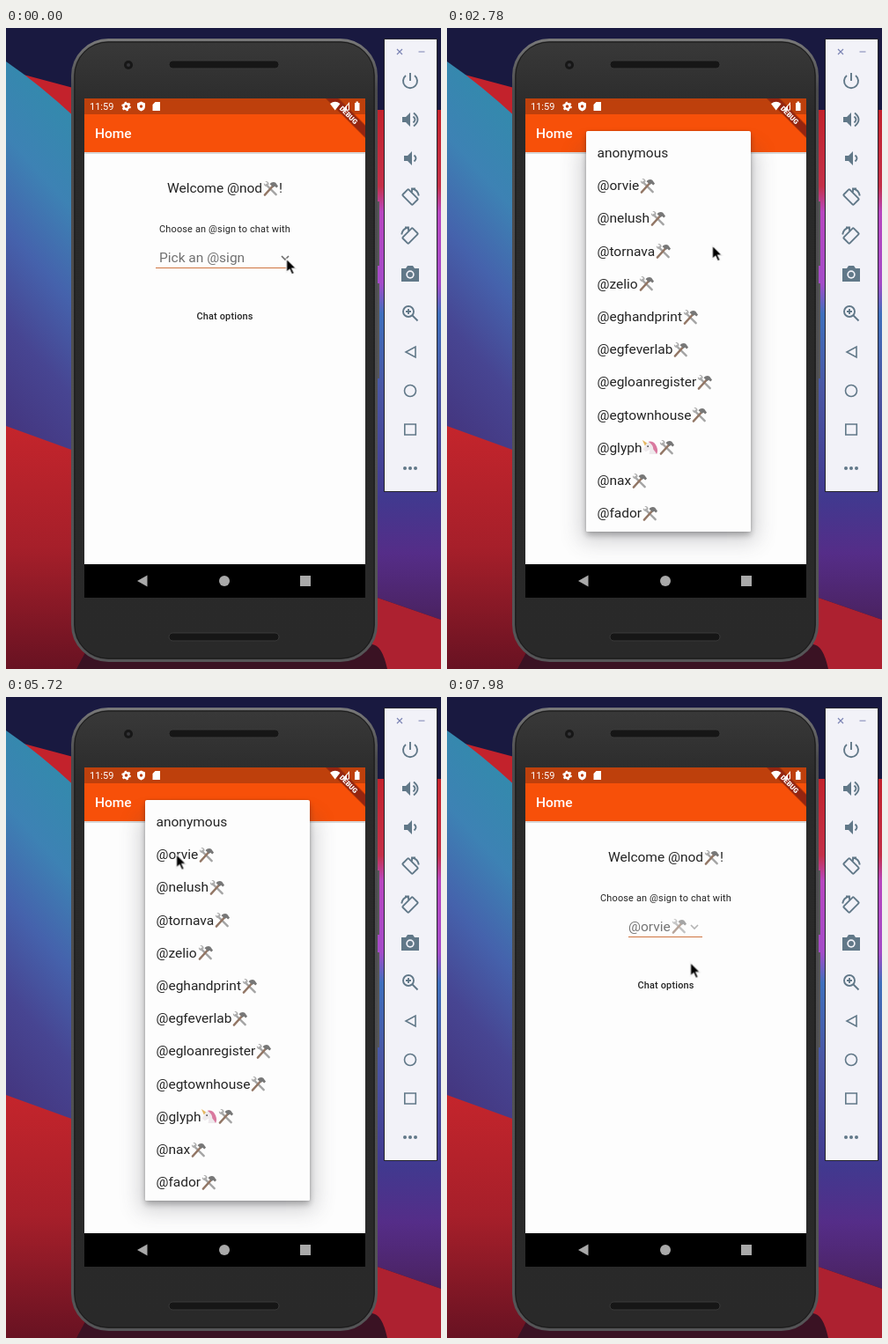
An HTML page for the animation above (8 s loop, 494x728 px).

```html
<!DOCTYPE html>
<html lang="en">
<head>
<meta charset="utf-8">
<title>Chat picker demo</title>
<style>
html, body { margin: 0; width: 100%; height: 100%; overflow: hidden; background: #17173a; }
#stage { position: relative; width: 494px; height: 728px; overflow: hidden; font: 15.5px Roboto, sans-serif; color: #242424; }
#stage > * { position: absolute; }
.scene { left: 0; top: 0; }
.line { left: 89px; width: 319px; height: 24px; display: flex; align-items: center; justify-content: center; white-space: pre; }
.small { font-size: 10.9px; letter-spacing: .18px; }
.emoji { width: 19px; height: 19px; flex: none; }
.pick { top: 249px; height: 24px; display: flex; align-items: center; box-sizing: border-box; border-bottom: 1.5px solid #cf7440; white-space: pre; }
.pick .emoji { opacity: .65; }
.pick .chevron { position: absolute; right: 4px; top: 8px; }
#menu { left: 158px; top: 117px; width: 187px; height: 455px; border-radius: 2px; box-shadow: 0 4px 7px rgba(0,0,0,.28), 0 0 3px rgba(0,0,0,.2); opacity: 0; isolation: isolate; }
#menu::before { content: ""; position: absolute; inset: 20px 0 0; z-index: -1; box-shadow: 0 5px 22px 6px rgba(70,70,80,.24); }
#rows { position: absolute; inset: 0; overflow: hidden; border-radius: 2px; background: #fdfdfd; }
.row { position: absolute; left: 12.5px; height: 37.2px; display: flex; align-items: center; }
#cursor { left: 0; top: 0; overflow: visible; }
</style>
</head>
<body>
<div id="stage">
<svg class="scene" width="494" height="728" viewBox="0 0 494 728">
  <defs>
    <linearGradient id="sky" x1=".2" y1="0" x2="0" y2="1">
      <stop offset="0" stop-color="#3489ad"/><stop offset=".22" stop-color="#3d82b4"/>
      <stop offset=".45" stop-color="#4562ac"/><stop offset=".68" stop-color="#474592"/><stop offset="1" stop-color="#43327b"/>
    </linearGradient>
    <linearGradient id="lava" x1="0" y1="0" x2="0" y2="1">
      <stop offset="0" stop-color="#c4252c"/><stop offset=".5" stop-color="#a61f2a"/><stop offset="1" stop-color="#681222"/>
    </linearGradient>
    <linearGradient id="east" x1="0" y1="0" x2="0" y2="1">
      <stop offset="0" stop-color="#c3222c"/><stop offset=".15" stop-color="#c43048"/><stop offset=".2" stop-color="#b847c0"/>
      <stop offset=".34" stop-color="#a44bc8"/><stop offset=".4" stop-color="#3f70bd"/><stop offset=".55" stop-color="#4a56a4"/>
      <stop offset=".76" stop-color="#41398f"/><stop offset=".87" stop-color="#552d88"/><stop offset="1" stop-color="#4a2260"/>
    </linearGradient>
    <linearGradient id="shell" x1="0" y1="0" x2="0" y2="1">
      <stop offset="0" stop-color="#393939"/><stop offset=".12" stop-color="#2a2a2a"/><stop offset="1" stop-color="#292929"/>
    </linearGradient>
    <linearGradient id="rim" x1="0" y1="0" x2="0" y2="1">
      <stop offset="0" stop-color="#787878"/><stop offset=".08" stop-color="#4a4a4c"/><stop offset="1" stop-color="#555557"/>
    </linearGradient>
    <clipPath id="screen"><path d="M89 80h319v567H89z"/></clipPath>
    <symbol id="tools" viewBox="0 0 20 20">
      <path d="M5 5.500 16.500 17" stroke="#a3a3a3" stroke-width="2.500" stroke-linecap="round"/>
      <path d="M2 3.500 5 6l1-3-2.500-1.700C6 .5 8 2 8 4.500L6 7.500C3.500 8 1.500 6 2 3.500z" fill="#adadad"/>
      <path d="m3 17.500 9.500-10.500" stroke="#927665" stroke-width="2.500" stroke-linecap="round"/>
      <path d="M9 4.500C11 2 14 1.500 16 3l3 4-2 2-2-2-1.500 1.500z" fill="#777"/>
    </symbol>
    <symbol id="unicorn" viewBox="0 0 20 20">
      <path d="M7 5 1 1l3 7z" fill="#e5b661"/>
      <path d="M6 5q5-4 9 1 4 5 3 12H9l1-6-5 3-3-3z" fill="#eee9ec"/>
      <path d="M8 3q7-2 10 6 2 5 0 9-2-4-4-6 0-5-6-9z" fill="#d9799f"/>
      <circle cx="7.500" cy="8.500" r="1" fill="#444"/>
    </symbol>
    <g id="turn" fill="none" stroke="#617888" stroke-width="1.900">
      <rect x="-8" y="-4.800" width="16" height="9.600" rx="1" transform="rotate(45)"/>
      <path d="M2.500-9.500A10 10 0 0 1 9.800-1.500M6-9.500H2v4"/>
    </g>
  </defs>

  <!-- wallpaper -->
  <path d="M0 0h494v728H0z" fill="#191940"/>
  <path d="M20 53 80 69v40L38 73z" fill="#c3222c"/>
  <path d="M0 38Q38 64 80 103v380L0 453z" fill="url(#sky)"/>
  <path d="M0 452 80 481 170 728H0z" fill="url(#lava)"/>
  <path d="M416 93h78v579l-78-27z" fill="url(#east)"/>
  <path d="M416 645 494 672v56h-78z" fill="#ad2130"/>
  <path d="M95 700h320q12 0 18 28H80z" fill="#3a1223"/>

  <!-- phone -->
  <path d="M420 197h4v73h-4zM420 290h4v108h-4z" fill="#565658"/>
  <rect x="75.500" y="13.500" width="345" height="705" rx="41" fill="url(#shell)" stroke="url(#rim)" stroke-width="3"/>
  <rect x="78" y="16" width="340" height="700" rx="38" fill="none" stroke="#1b1b1b"/>
  <g fill="#161616" stroke="#3b3b3b"><rect x="185" y="37" width="125" height="9" rx="4.500"/><rect x="185" y="687" width="125" height="9" rx="4.500"/></g>
  <circle cx="139" cy="42" r="5" fill="#171717"/><circle cx="139" cy="42" r="2" fill="#353538"/>
  <g clip-path="url(#screen)">
    <path d="M89 80h319v567H89z" fill="#fdfdfd"/>
    <path d="M89 141h319v2H89z" fill="#d8d8d8"/>
    <path d="M89 80h319v61H89z" fill="#f75009"/>
    <path d="M89 80h319v18H89z" fill="#be400c"/>
    <path d="M89 609h319v38H89z"/>
    <g transform="translate(408 80) rotate(45)">
      <path d="M-40 21h80v11h-80z" fill="#68200055"/>
      <path d="M-40 22h80v9.300h-80z" fill="#942510"/>
      <text y="29.500" text-anchor="middle" fill="#fff" font-family="Roboto, sans-serif" font-size="7.900" font-weight="900">DEBUG</text>
    </g>
  </g>
  <g fill="#fff">
    <text x="95" y="93" font-family="Roboto, sans-serif" font-size="11">11:59</text>
    <circle cx="136.500" cy="89" r="3" fill="none" stroke="#fff" stroke-width="2.400"/>
    <circle cx="136.500" cy="89" r="4.600" fill="none" stroke="#fff" stroke-width="1.500" stroke-dasharray="2.200 2.617"/>
    <path d="m153.500 83.500 4.500 2v3.500q0 4-4.500 5.500-4.500-1.500-4.500-5.500v-3.500z"/>
    <circle cx="153.500" cy="89" r="1.700" fill="#be400c"/>
    <path d="M166.500 87l3-3h5.500v10h-8.500z"/>
    <path d="M368 86q5.700-4.500 11.500 0l-5.800 7.500z"/>
    <path d="M390 84v9.500h-8.500zM387 89v3.500h2V87z" fill-rule="evenodd"/>
    <path d="M396 85h1.500v-1.500h2.500V85h1.500v9H396z"/>
  </g>
  <g fill="#a9a9a9"><path d="m149 628 11.500-6.500v13z"/><circle cx="248" cy="628" r="6"/><path d="M334 622h12v12h-12z"/></g>

  <!-- emulator controls -->
  <rect x="429.500" y="12.500" width="60" height="514" fill="#f2f2f8" stroke="#24242c"/>
  <g fill="none" stroke="#617888" stroke-width="1.900">
    <path d="m444 24 6 6m0-6-6 6M468.500 27h7" stroke="#7c84b4" stroke-width="1.200"/>
    <path d="M459 51v9M454 54a8 8 0 1 0 10 0"/>
    <path d="M462.500 100.500q4 3.500 0 7M463 96.500q9 7.500 0 15"/>
    <path d="M463.500 144.500q4 3.500 0 7"/>
    <circle cx="457" cy="322" r="6"/><path d="m461.500 326.500 6 6M454 322h6m-3-3v6"/>
    <path d="M465 362v12l-11-6z" stroke-width="1.600"/><circle cx="459" cy="412" r="6.500" stroke-width="1.600"/><path d="M452.800 450h12.500v12h-12.500z" stroke-width="1.600"/>
  </g>
  <use href="#turn" transform="translate(459 192)"/>
  <use href="#turn" transform="translate(459 236) scale(-1 1)"/>
  <g fill="#617888">
    <path d="M450 101h4l5-5v16l-5-5h-4zM452 145h4l5-5v16l-5-5h-4z"/>
    <path d="M449 273h5l2-3h6l2 3h5v15h-20z"/><circle cx="459" cy="280" r="4.700" fill="#f2f2f8"/><circle cx="459" cy="280" r="3"/>
    <circle cx="453" cy="500" r="2"/><circle cx="459" cy="500" r="2"/><circle cx="465" cy="500" r="2"/>
  </g>
</svg>

<div class="line" style="left:101px;top:108px;width:60px;justify-content:flex-start;color:#fff;font-weight:500">Home</div>
<div class="line" style="top:170px">Welcome @nod<svg class="emoji"><use href="#tools"/></svg>!</div>
<div class="line small" style="top:216px">Choose an @sign to chat with</div>
<div class="pick" id="hint" style="left:170px;width:156px;padding-left:4px;color:#707070">Pick an @sign<svg class="chevron" width="10" height="8"><path d="m1 2 4 4 4-4" fill="none" stroke="#6a6a6a" stroke-width="1.600"/></svg></div>
<div class="pick" id="chosen" style="left:206px;width:84px;color:#747474">@orvie<svg class="emoji"><use href="#tools"/></svg><svg class="chevron" width="10" height="8"><path d="m1 2 4 4 4-4" fill="none" stroke="#b4b4b4" stroke-width="1.600"/></svg></div>
<div class="line small" style="top:315px;font-weight:500">Chat options</div>
<div id="menu"><div id="rows"></div></div>
<svg id="cursor" width="14" height="20"><path d="M0 0v15.500l3.600-3.300 2.500 5.600 2.700-1.200-2.500-5.400H11z" stroke="#f4f4f4" stroke-width="1.200"/></svg>
</div>

<script>
const LOOP = 8000, OPEN = 400, CLOSE = 6050;
const $ = id => document.getElementById(id);

// Each step is [time in ms, keyframe].
const play = (el, steps) => el.animate(
  steps.map(([ms, frame]) => ({ offset: ms / LOOP, ...frame })),
  { duration: LOOP, iterations: Infinity });
const fade = (el, start, length) => play(el, [
  [0, { opacity: 0 }], [start, { opacity: 0 }],
  [start + length, { opacity: 1 }], [LOOP, { opacity: 1 }]]);
// The pick fields change places while the menu covers them.
const swap = (el, before) => play(el, [
  [0, { opacity: before, easing: "steps(1, end)" }],
  [3000, { opacity: 1 - before }], [LOOP, { opacity: 1 - before }]]);

const emoji = name => `<svg class="emoji"><use href="#${name}"/></svg>`;
const handles = ["orvie", "nelush", "tornava", "zelio", "eghandprint", "egfeverlab",
  "egloanregister", "egtownhouse", "glyph", "nax", "fador"];
const labels = ["anonymous", ...handles.map(name =>
  "@" + name + (name === "glyph" ? emoji("unicorn") : "") + emoji("tools"))];

labels.forEach((label, i) => {
  const row = document.createElement("div");
  row.className = "row";
  row.style.top = 6.5 + i * 37.2 + "px";
  row.innerHTML = label;
  $("rows").append(row);
  fade(row, OPEN + 140 + i * 9, 60);
});

play($("menu"), [
  [0, { opacity: 0, height: "44px" }],
  [OPEN, { opacity: 0, height: "44px" }],
  [OPEN + 75, { opacity: 1, height: "44px", easing: "ease-out" }],
  [OPEN + 150, { opacity: 1, height: "455px" }],
  [CLOSE, { opacity: 1, height: "455px" }],
  [CLOSE + 150, { opacity: 0, height: "455px" }],
  [LOOP, { opacity: 0, height: "455px" }]]);
swap($("hint"), 1);
swap($("chosen"), 0);

const path = [[0, 318.5, 262], [2450, 318.5, 262], [2780, 301.5, 247], [3250, 232, 206],
  [3700, 199.5, 184.5], [4200, 199.5, 184.5], [4600, 193.5, 178.5],
  [6560, 193.5, 178.5], [7100, 240, 245], [7600, 276.5, 301.5], [LOOP, 276.5, 301.5]];
play($("cursor"), path.map(([ms, x, y]) => [ms, { transform: `translate(${x}px, ${y}px)` }]));
</script>
</body>
</html>
```
